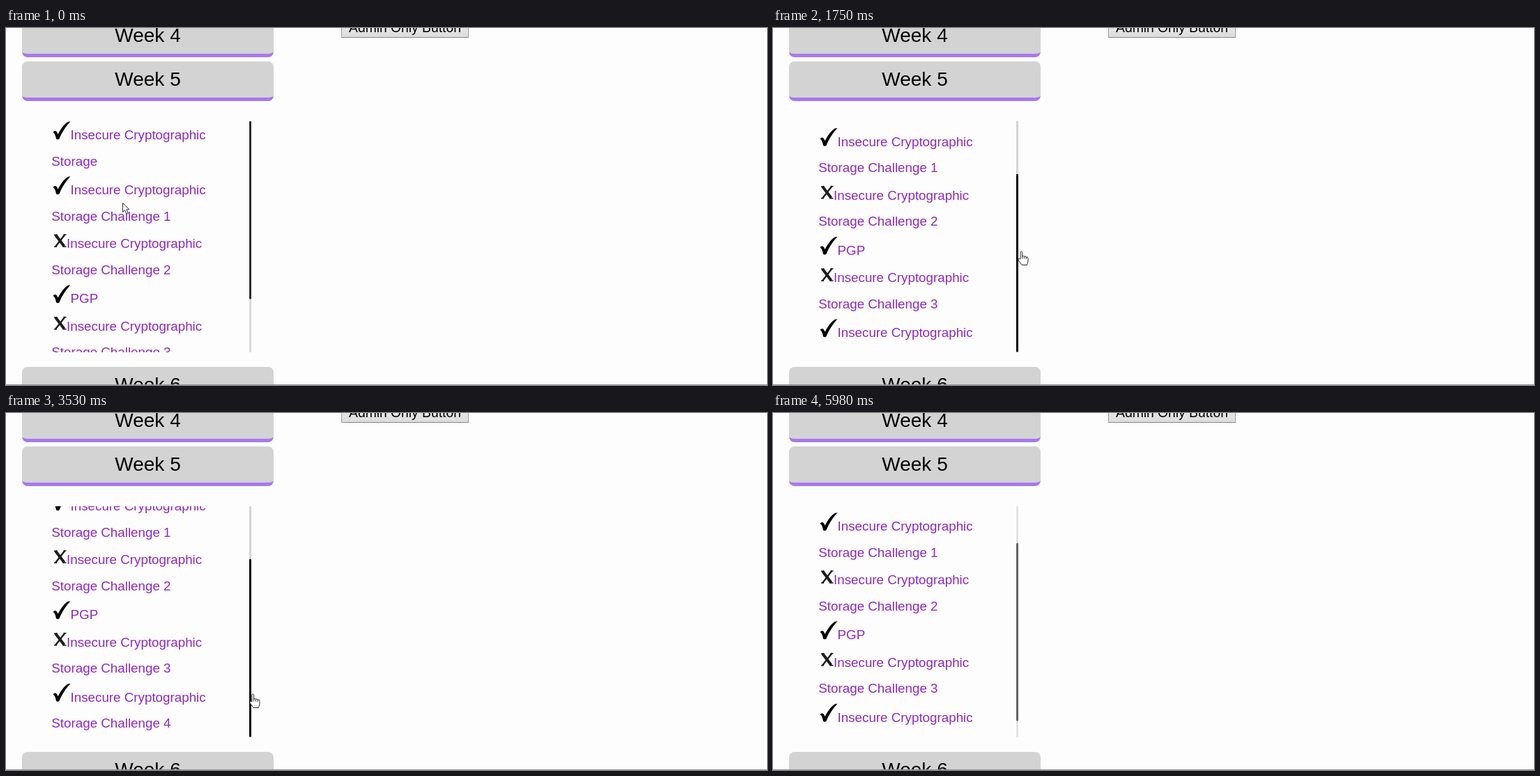
An HTML page for the animation above (7100 ms loop, 1092x513 px).

```html
<!DOCTYPE html>
<html lang="en">
<head>
<meta charset="utf-8">
<title>Challenge list</title>
<style>
  html, body { margin: 0; width: 100%; height: 100%; overflow: hidden; background: #fdfdfd; }
  body { position: relative; font-family: "Liberation Sans", Arial, sans-serif; }
  .week {
    position: absolute; left: 23px; width: 361px; height: 57px; box-sizing: border-box;
    border-bottom: 5px solid #a877ee; border-radius: 8px; background: #d3d3d3;
    font-size: 28px; line-height: 52px; text-align: center;
  }
  svg { position: absolute; left: 0; top: 0; }
  .list { font-size: 18.8px; fill: #9028c0; }
  .hidden { display: none; }
</style>
</head>
<body>
<div class="week" style="top:-15.5px">Week 4</div>
<div class="week" style="top:48px">Week 5</div>
<div class="week" style="top:487px">Week 6</div>
<svg width="1092" height="513" viewBox="0 0 1092 513">
  <defs>
    <clipPath id="view"><rect x="60" y="134" width="285" height="332"/></clipPath>
    <linearGradient id="face" x2="0" y2="1"><stop stop-color="#f2f2f2"/><stop offset="1" stop-color="#dcdcdc"/></linearGradient>
    <filter id="soft"><feGaussianBlur stdDeviation=".5"/></filter>
    <path id="check" d="M92.5-26C86-19 80-10 76.500-1Q74 1 72-1C71-6 70-9 67.500-10.500C70-13.500 73-13 74.500-7.500C78.500-15 83-22 89-25.500Z"/>
    <g id="cross" fill="none" stroke="#1c1c1c" filter="url(#soft)">
      <path stroke-width="4" d="M71-19L83.500-2.500"/>
      <path stroke-width="2.400" d="M84.500-19.500L71-2"/>
      <path stroke-width="1.500" d="M69-19H73.500M82.500-19.300H86.500M69-2H73M81.500-2H86.500"/>
    </g>
  </defs>
  <rect x="481.500" y="-20.500" width="182" height="34" fill="url(#face)" stroke="#a0a0a0"/>
  <path d="M482 13.500H664" stroke="#858585"/>
  <text x="572.500" y="5.500" font-size="19.300" text-anchor="middle">Admin Only Button</text>
  <g clip-path="url(#view)"><g id="list" class="list"></g></g>
  <g id="rail">
    <rect x="349" y="134" width="3" height="332" fill="#d3d3d3"/>
    <rect id="thumb" x="349" y="134" width="3" height="255.500" rx="1"/>
  </g>
  <path d="M0 512.500H1092" stroke="#9a9a9a"/>
  <g id="cursor" fill="#fff" stroke="#2a2a35" stroke-linejoin="round">
    <path id="arrow" d="M.5.5V13.500L3.600 10.700L6 16.300L8.300 15.300L6 9.800H10Z"/>
    <g id="hand">
      <path d="M4 12V1.800Q5.300-.3 6.700 1.800V8Q8.200 6.600 9.400 8.300Q11.200 7.200 12.200 9Q14.700 8.300 15 10.800V15L13.500 20.500H6L1 13.500Q.5 10.800 2.700 11.300Z"/>
      <path d="M6.700 8V11.500M9.400 8.300V11.500M12.200 9V12" fill="none"/>
    </g>
  </g>
</svg>
<script>
const $ = id => document.getElementById(id);
const LOOP = 7100, STEP = 136, LEAD = 46; // the picture advances in even steps
const TRAVEL = 76, SCROLL = 99;           // furthest thumb and list offsets

// [mark, first line, second line]
const topic = "Insecure Cryptographic";
const items = [
  ["check", topic, "Storage"],
  ["check", topic, "Storage Challenge 1"],
  ["cross", topic, "Storage Challenge 2"],
  ["check", "PGP"],
  ["cross", topic, "Storage Challenge 3"],
  ["check", topic, "Storage Challenge 4"],
];
let y = 118.8, html = "";
for (const [mark, first, second] of items) {
  const checked = mark === "check";
  y += checked ? 41.5 : 39.5;
  html += `<use href="#${mark}" y="${y}" fill="#000"/><text x="${checked ? 92.5 : 87}" y="${y}">${first}</text>`;
  if (second) html += `<text x="65.300" y="${y += 37.5}">${second}</text>`;
}
$("list").innerHTML = html;

const clamp = (v, low, high) => Math.min(Math.max(v, low), high);
const ramp = (s, from, to) => clamp((s - from) / (to - from), 0, 1);
// Slow start and long settling tail
const glide = (u, start, tail) => 1 - (1 - u ** start) ** tail;

// Pointer stops: [step, x, y]
const stops = [
  [0, 167, 251], [2, 375, 230], [5, 348, 218], [6, 339, 218], [8, 339, 218],
  [11, 352, 283], [15, 349, 357], [16, 349, 383], [20, 349, 383], [26, 349, 403], [28, 349, 403],
  [33, 331, 276], [38, 331, 276], [41, 338, 300], [42, 338, 300], [43, 816, 496],
];

function pointer(s) {
  const next = stops.findIndex(stop => stop[0] > s);
  if (next < 0) return stops.at(-1).slice(1);
  const [from, x, y] = stops[next - 1], [to, x2, y2] = stops[next];
  const k = ramp(s, from, to);
  return [x + (x2 - x) * k, y + (y2 - y) * k];
}

// The thumb follows the pointer during two drags, down and then up
function thumbOffset(s) {
  if (s < 8) return 0;
  const grab = s < 28 ? 227 : 223;
  return clamp(pointer(Math.min(s, 33))[1] - grab, 0, TRAVEL);
}

const listOffset = s =>
  SCROLL * glide(ramp(s, 8, 20), 2.1, 7) - 29 * glide(ramp(s, 28, 38), 2.7, 3.4);

const railOpacity = s =>
  .82 + .18 * ramp(s, 0, 1) - .1 * ramp(s, 33, 35) - .3 * ramp(s, 42, 44);

function draw(time) {
  const s = Math.floor((time % LOOP + LEAD) / STEP);
  const isHand = s >= 4 && s < 43;
  $("list").setAttribute("transform", `translate(0 ${-listOffset(s)})`);
  $("thumb").setAttribute("y", 134 + thumbOffset(s));
  $("rail").setAttribute("opacity", railOpacity(s));
  $("cursor").setAttribute("transform", `translate(${pointer(s).map(Math.round)})`);
  $("cursor").classList.toggle("hidden", s >= 44);
  $("arrow").classList.toggle("hidden", isHand);
  $("hand").classList.toggle("hidden", !isHand);
}

const start = performance.now();
function frame() {
  draw(performance.now() - start);
  requestAnimationFrame(frame);
}
frame();
</script>
</body>
</html>
```
